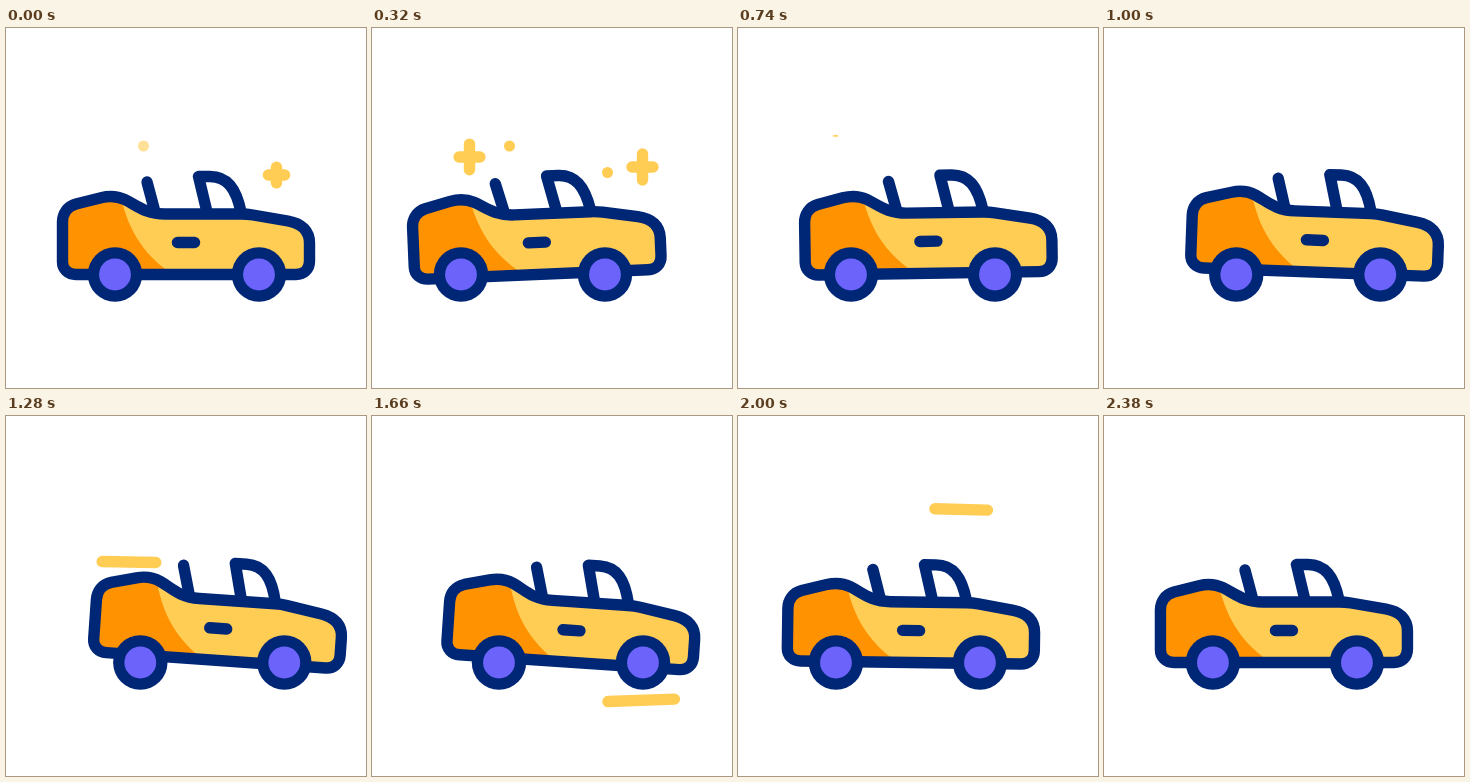
An HTML page with a canvas that plays this animation: 360x360 px, repeating every 2400 ms.

```html
<!DOCTYPE html>
<html lang="en">
<head>
<meta charset="utf-8">
<title>Car</title>
<style>
html, body { margin: 0; width: 100%; height: 100%; overflow: hidden; background: #fff; }
canvas { display: block; width: 360px; height: 360px; }
</style>
</head>
<body>
<canvas id="stage"></canvas>
<script>
const LOOP = 2400;
const NAVY = '#002676', YELLOW = '#ffcd54', ORANGE = '#ff9200', PURPLE = '#6c63fa';
const STROKE = 11.4;

const canvas = document.getElementById('stage');
const ctx = canvas.getContext('2d');
const ratio = window.devicePixelRatio || 1;
canvas.width = canvas.height = 360 * ratio;

const clamp = u => Math.min(1, Math.max(0, u));
const ease = u => (1 - Math.cos(Math.PI * clamp(u))) / 2;
const bump = u => Math.sin(Math.PI * clamp(u)) ** 2;

// Smooth track through [time, value] keys, flat at every turning point.
function track(...keys) {
  const rate = keys.slice(1).map(([t, v], i) => (v - keys[i][1]) / (t - keys[i][0]));
  const slope = keys.map((_, i) => {
    const a = rate[i - 1] || 0, b = rate[i] || 0;
    return a * b > 0 ? 2 * a * b / (a + b) : 0;
  });
  return t => {
    const i = keys.findIndex(k => k[0] > t) - 1;
    const [t0, v0] = keys[i], [t1, v1] = keys[i + 1];
    const d = t1 - t0, u = (t - t0) / d, w = 1 - u;
    return w * w * ((1 + 2 * u) * v0 + u * d * slope[i])
         + u * u * ((3 - 2 * u) * v1 - w * d * slope[i + 1]);
  };
}

// The car backs up, surges forward, eases off, drops back and settles.
const bodyX = track([0, 0], [340, -15.3], [1120, 34], [1660, 19.5], [2030, -7.3], [LOOP, 0]);
const wheelX = track([0, 0], [340, -20.2], [1120, 26.2], [1660, 18], [2030, -11.5], [LOOP, 0]);
const tilt = track([0, 0], [430, -2.9], [1300, 4], [1600, 4], [2060, 0.5], [LOOP, 0]);
const lift = t => 2.5 * bump((t - 400) / 1400);

const body = new Path2D('M70 246.5C62 246.5 56.5 241 56.5 234V194C56.5 186 61 178.500 70 176' +
  'L95 169.700C104 167.500 112 168.300 119 171.700C131 177.500 139 186 159 186H235' +
  'C239 186 243 186.300 247 187L282 193C296 195.500 303.500 203 303.500 215V233' +
  'C303.500 241 298 246.500 290 246.500Z');
const shade = new Path2D('M40 150H111C119 200 136 226 169 248H40Z');
const seat = new Path2D('M141 154L149 184');
const windscreen = new Path2D('M201 184L192.500 148.500H204C221 148.500 230 160 235 184');
const handle = new Path2D('M171.500 214.500H188.500');

function outline(path, color = NAVY) {
  ctx.strokeStyle = color;
  ctx.lineWidth = STROKE;
  ctx.stroke(path);
}

function segment(x0, y0, x1, y1) {
  const path = new Path2D();
  path.moveTo(x0, y0);
  path.lineTo(x1, y1);
  return path;
}

function circle(x, y, r, color) {
  ctx.fillStyle = color;
  ctx.beginPath();
  ctx.arc(x, y, r, 0, 2 * Math.PI);
  ctx.fill();
}

function drawCar(t) {
  ctx.save();
  ctx.translate(180 + bodyX(t), 214.5 - lift(t));
  ctx.rotate(tilt(t) * Math.PI / 180);
  ctx.translate(-180, -214.5);
  ctx.fillStyle = YELLOW;
  ctx.fill(body);
  ctx.save();
  ctx.clip(body);
  ctx.fillStyle = ORANGE;
  ctx.fill(shade);
  ctx.restore();
  [seat, windscreen, body, handle].forEach(path => outline(path));
  ctx.restore();

  for (const x of [109, 253]) {
    circle(x + wheelX(t), 246.5, 27.2, NAVY);
    circle(x + wheelX(t), 246.5, 15.9, PURPLE);
  }
}

// Wind streaks run left from (x, y); the tail follows the head after a lag.
const streaks = [
  { x: 190, y: 147.2, slope: 0.018, start: 1113, lag: 67 },
  { x: 337, y: 281.8, slope: -0.037, start: 1484, lag: 84 },
  { x: 321, y: 95.8, slope: 0.024, start: 1793, lag: 67 }
];

function drawStreak({ x, y, slope, start, lag }, t) {
  const run = delay => 158 * ease((t - start - delay) / 300);
  const head = run(0), tail = run(lag);
  if (head > tail) {
    outline(segment(x - tail, y - slope * tail, x - head, y - slope * head), YELLOW);
  }
}

// Share of full presence for something that grows in, stays and leaves.
const presence = (age, life, grow, fade) => ease(age / grow) * ease((life - age) / fade);

const sparkles = [
  { x: 97.5, y: 142, rise: 0.05, start: 60 },
  { x: 270.5, y: 151, rise: 0.025, start: -157 }
];
const dots = [
  { x: 137.5, y: 118, start: -45 },
  { x: 235.5, y: 144.5, start: 160 }
];

function drawSparkle({ x, y, rise, start }, t) {
  const age = t - start;
  const size = presence(age, 700, 280, 130);
  if (size < 0.01) return;
  const cy = y - rise * age;
  const across = 10.5 * Math.sqrt(size), up = 13 * size;
  ctx.strokeStyle = YELLOW;
  ctx.lineWidth = STROKE * Math.min(1, 2 * size);
  ctx.stroke(segment(x - across, cy, x + across, cy));
  ctx.stroke(segment(x, cy - up, x, cy + up));
}

function drawDot({ x, y, start }, t) {
  ctx.globalAlpha = presence(t - start, 500, 80, 100);
  circle(x, y, 5.5, YELLOW);
  ctx.globalAlpha = 1;
}

function draw(now) {
  const t = now % LOOP;
  ctx.setTransform(ratio, 0, 0, ratio, 0, 0);
  ctx.fillStyle = '#fff';
  ctx.fillRect(0, 0, 360, 360);
  ctx.lineCap = ctx.lineJoin = 'round';
  streaks.forEach(s => drawStreak(s, t));
  sparkles.forEach(s => drawSparkle(s, t));
  dots.forEach(d => drawDot(d, t));
  drawCar(t);
  requestAnimationFrame(draw);
}
requestAnimationFrame(draw);
</script>
</body>
</html>
```
